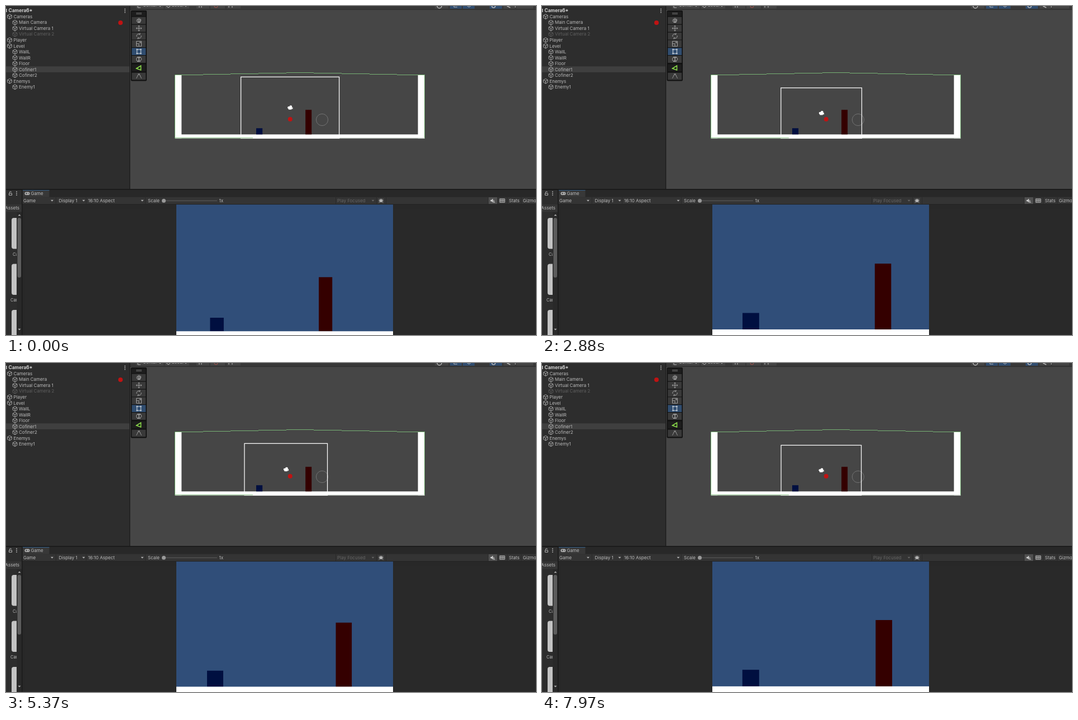
Recreate the animation shown at these times as an HTML page with a canvas. Size 949x590 px, loop 8 s.

```html
<!DOCTYPE html>
<html lang="en">
<head>
<meta charset="utf-8">
<title>Virtual camera blend</title>
<style>
html, body { margin: 0; width: 100%; height: 100%; overflow: hidden; background: #282828; }
canvas { display: block; }
</style>
</head>
<body>
<canvas id="stage" width="949" height="590"></canvas>
<script>
const g = document.getElementById('stage').getContext('2d');
const LOOP = 8000, BLEND = 1750;
// Times at which the active camera changes: 0 = wide, 1 = close
const SWITCHES = [[500, 1], [2530, 0], [3930, 1], [5040, 0], [6180, 1], [7680, 0]];
const TEXT = '#bcbcbc', ICON = '#b4b4b4', OFF = '#606060', NAVY = '#000f40', MAROON = '#340000', RED = '#bf1313';

function rect(x, y, w, h, color) {
  g.fillStyle = color;
  g.fillRect(x, y, w, h);
}
function box(x, y, w, h, r, color) {
  g.fillStyle = color;
  g.beginPath();
  g.roundRect(x, y, w, h, r);
  g.fill();
}
function dot(x, y, r, color) {
  g.fillStyle = color;
  g.beginPath();
  g.arc(x, y, r, 0, 7);
  g.fill();
}
function path(d, color, x = 0, y = 0, width = 1, filled = false) {
  g.save();
  g.translate(x, y);
  g.lineWidth = width;
  g.strokeStyle = g.fillStyle = color;
  const p = new Path2D(d);
  filled ? g.fill(p) : g.stroke(p);
  g.restore();
}
function text(s, x, y, color = TEXT, font = '8px') {
  g.font = font + ' Inter, Roboto, sans-serif';
  g.fillStyle = color;
  g.fillText(s, x, y);
}
const caret = (x, y, color = ICON) => path('M-2.5-1.2H2.5L0 1.6Z', color, x, y, 1, true);
const kebab = (x, y) => [-3, 0, 3].forEach(d => dot(x, y + d, .9, ICON));

// Interrupted blends back out in the share of the full time already spent
function blendAt(t) {
  let from = 0, to = 0, start = 0, span = 1, base = 0;
  const phase = now => Math.min(1, (now - start) / span);
  const value = now => {
    const u = phase(now);
    return from + (to - from) * u * u * (3 - 2 * u);
  };
  for (const [at, target] of SWITCHES) {
    if (t < at) break;
    const u = phase(at), done = base + (1 - base) * u;
    from = value(at);
    to = target;
    base = 1 - done;
    span = BLEND * done;
    start = at;
  }
  return { zoom: value(t), active: to };
}

function hierarchy(active) {
  rect(0, 0, 221, 328, '#2d2d2d');
  rect(0, 108.3, 221, 10.6, '#3f3f3f');
  rect(0, 5, 1.5, 6, '#c8c8c8');
  text('Camera6*', 4.5, 8.5, '#d0d0d0', 'bold 8.4px');
  kebab(213, 8.5);
  const rows = ['Cameras', ' Main Camera', ' Virtual Camera 1', ' Virtual Camera 2', 'Player', 'Level',
    ' WallL', ' WallR', ' Floor', ' Cofiner1', ' Cofiner2', 'Enemys', ' Enemy1'];
  rows.forEach((name, i) => {
    const child = name[0] === ' ', x = child ? 16 : 6.5, y = 19 + i * 10.52;
    const off = i === 3 - active;
    path('M0-4.3 3.8-2.2V2.2L0 4.3-3.8 2.2V-2.2ZM-3.8-2.2 0 0 3.8-2.2M0 0V4.3', off ? OFF : ICON, x, y, .9);
    text(name.trim(), x + 7, y + .5, off ? OFF : TEXT);
  });
  dot(205, 30, 4, RED);
  rect(221, 0, 1.3, 329, '#1b1b1b');
}

function topStrip() {
  rect(222, 0, 727, 6.3, '#383838');
  rect(222, 6, 727, .8, '#2a2a2a');
  for (const [x, w] of [[233, 49], [285, 43], [341, 23], [366, 26], [396, 24], [768, 24], [891, 20], [914, 30]])
    rect(x, 0, w, 4.5, '#444');
  for (const [x, w] of [[795, 21], [818, 21], [866, 22]]) rect(x, 0, w, 4.8, '#304d70');
  text('Center', 245, -1);
  text('Local', 297, -1);
  caret(276, 0);
  caret(322, 0);
  path('M236 0V3H241M287 0 291 3 294 0M346 0V3M350 0V3M399 0V3M405 0V3M802 0V2H808M826 0 829 2 832 0M912 0V3', ICON);
  path('M373 0A3 3 0 0 0 379 0', '#a65049');
  path('M772 0A4 4 0 0 0 780 0M870 0A3 3 0 0 0 876 0M897 0 903 3', ICON, 0, 0, 1.5);
}

function toolPalette() {
  box(223.5, 8, 28.5, 126.5, 2, '#111');
  rect(225, 9.5, 25.5, 9, '#1d1d1d');
  path('M233 12.5H243M233 14.5H243', '#666');
  const tools = [
    [26, 'M-3 0V-2.5M-1-1V-4.5M1-1V-4.5M3 0V-3M-4.5 0-2 3.5H2L3.5 0V-1H-3.5M-2 1H3M-2 2.5H2'],
    [40, 'M-5 0H5M0-5V5M-3.5-1.5-5 0-3.5 1.5M3.5-1.5 5 0 3.5 1.5M-1.5-3.5 0-5 1.5-3.5M-1.5 3.5 0 5 1.5 3.5'],
    [54, 'M-4 1A4 4 0 0 1 2-3.5M4-1A4 4 0 0 1-2 3.5M2-5.5V-3H-.5M-2 5.5V3H.5'],
    [67.7, 'M-4.5-4.5H4.5V4.5H-4.5ZM-4.5 0H0V4.5M1-1 3-3M1-3H3V-1'],
    [81.6, 'M-3.5-3.5H3.5V3.5H-3.5ZM-5-3.5H-2M2-3.5H5M-5 3.5H-2M2 3.5H5M-3.5-5V5M3.5-5V5'],
    [95.5, 'M-4.5-1A2 2 0 0 1 0-1 2 2 0 0 1 4.5-1 2 2 0 0 1 0 1 2 2 0 0 1-4.5 1ZM0-4.5V4.5M-3-4H3M-3 4H3'],
    [111, 'M-4.5 1 3.5-4V4Z'],
    [126, 'M-5 3.5C-3 3.5-3-3 0-3S3 3.5 5 3.5M-2-4H2']
  ];
  tools.forEach(([y, d], i) => {
    rect(225.3, y - 6.4, 25, 12.8, i === 4 ? '#304d70' : i === 6 ? '#1d1d1d' : '#393939');
    path(d, i === 6 ? '#8de04a' : i === 4 ? '#d0d8e0' : '#a0a0a0', 238, y, i === 6 ? 1.5 : 1);
  });
}

function sceneView(cam, active) {
  rect(222, 0, 727, 329, '#464646');
  topStrip();
  toolPalette();
  rect(303, 124, 11.3, 113.5, '#fff');
  rect(737.6, 123.5, 11.6, 114, '#fff');
  rect(303, 230.3, 446, 7, '#fff');
  rect(448, 219.2, 11.2, 11.1, NAVY);
  rect(536.2, 186.2, 11, 44.1, MAROON);

  const green = '#77b174';
  for (let x = 303; x < 750; x++)
    rect(x, Math.round(119 + 4.5 * Math.abs(x - 526) / 223.5), 1, 1, green);
  path('M302.5 123.5V237.5M749.5 123V237.5', green);
  rect(303, 236.5, 447, 1, '#b4bdb3');
  path('M566 193.5A10.5 10.5 0 1 1 565.99 193.5', '#797979', 0, 0, .9);

  g.strokeStyle = '#fff';
  g.lineWidth = 1.25;
  g.strokeRect(cam.x, cam.y, cam.w, cam.h);
  rect(303, 236, 139, 1, '#85bd81');

  active ? dot(453.6, 224.8, 4, RED) : dot(508.8, 203, 4, RED);
  const cx = cam.x + cam.w / 2, cy = cam.y + cam.h / 2;
  dot(cx - 2.3, cy, 2.1, '#fff');
  dot(cx + 1.2, cy - 1.5, 2.4, '#fff');
  box(cx - 3, cy - .8, 6, 4.4, 1, '#fff');
  path('M2 1 4.8-1V3Z', '#fff', cx, cy, 1, true);
}

function projectPanel() {
  rect(0, 330, 28.5, 260, '#2d2d2d');
  rect(0, 356, 28, 13, '#353535');
  path('M-2.5 0H2.5V3.3H-2.5ZM-1.6-.5V-2A1.7 1.7 0 0 1 1.7-2', ICON, 8, 336);
  kebab(19, 336);
  text('Assets', -1.5, 363);
  g.save();
  g.beginPath();
  g.rect(0, 370, 19, 220);
  g.clip();
  for (const y of [380, 462.5, 545]) box(10, y, 20, 55.5, 4, '#c3c3c3');
  text('Camera', 12, 445.5, TEXT, '7.5px');
  text('Camera', 8, 527.5, TEXT, '7.5px');
  g.restore();
  rect(19.5, 370, 8.5, 220, '#292929');
  box(20.5, 380, 6.5, 107, 3, '#5c5c5c');
  path('M-2.5 1.3H2.5L0-1.6Z', ICON, 24, 375, 1, true);
  caret(24, 580);
  rect(28, 330, 1.5, 260, '#1b1b1b');
}

function gameToolbar() {
  rect(0, 328, 949, 1.7, '#191919');
  rect(29, 329.7, 920, 13, '#282828');
  rect(30, 330, 47.5, 12.7, '#383838');
  rect(30, 330, 47.5, 1, '#355f88');
  box(33.5, 333.5, 9, 5.5, 2.5, ICON);
  path('M35 336.2H38M36.5 334.7V337.7M40 335V337.5', '#383838', 0, 0, .9);
  text('Game', 44.5, 336.8);

  rect(29, 342.7, 920, 13, '#343434');
  rect(29, 355.3, 920, .8, '#202020');
  for (const x of [89, 143, 249, 590, 663, 680, 863, 880, 897, 922]) rect(x, 343, .8, 12, '#292929');
  text('Game', 31, 349.5);
  text('Display 1', 94.5, 349.5);
  text('16:10 Aspect', 147, 349.5);
  text('Scale', 254, 349.5);
  text('1x', 381.5, 349.5);
  text('Play Focused', 593, 349.5, '#666');
  for (const x of [82.5, 139, 244]) caret(x, 349);
  caret(657, 349, '#666');
  rect(282, 348.7, 96, 1, '#606060');
  dot(282.5, 349.2, 3.5, '#999');
  dot(671.5, 349.3, 2.7, ICON);
  path('M-4-3-2-1.5M4-3 2-1.5M-4.5 0H4.5M-4 3.5-2 2M4 3.5 2 2M-1.5-4 0-2.5 1.5-4', ICON, 671.5, 349.3);
  rect(864, 343, 15.5, 12, '#505050');
  path('M-3-1.2H-1.2L1.5-3.5V3.5L-1.2 1.2H-3Z', '#d0d0d0', 870.5, 349, 1, true);
  path('M3-1V3M2 3H5', '#d0d0d0', 870.5, 349);
  path('M884 345.8H893V352.2H884ZM886 346V352M888.5 346V352M891 346V352M884 348.8H893', ICON);
  text('Stats', 900.5, 349.5);
  text('Gizmos', 925.5, 349.5);
}

function gameView(cam) {
  rect(29, 356, 920, 234, '#282828');
  rect(34, 364, 915, 226, '#292929');
  g.save();
  g.beginPath();
  g.rect(305, 356, 388, 234);
  g.clip();
  rect(305, 356, 388, 234, '#304e79');
  const s = 388 / cam.w;
  const world = (x, y, w, h, color) =>
    rect(305 + (x - cam.x) * s, 356 + (y - cam.y) * s, w * s, h * s, color);
  world(448, 219.3, 11.1, 11.1, NAVY);
  world(536.3, 186.3, 10.95, 44.1, MAROON);
  world(303, 230.3, 447, 12, '#fff');
  g.restore();
}

function draw(t) {
  const { zoom, active } = blendAt(t);
  const w = 176 - 35 * zoom, h = w / 1.6;
  const cam = { x: 420.6 + 8.1 * zoom, y: 237.2 - h, w, h };
  g.textBaseline = 'middle';
  sceneView(cam, active);
  hierarchy(active);
  gameView(cam);
  gameToolbar();
  projectPanel();
}

const begin = performance.now();
function tick() {
  draw((performance.now() - begin) % LOOP);
  requestAnimationFrame(tick);
}
tick();
</script>
</body>
</html>
```
